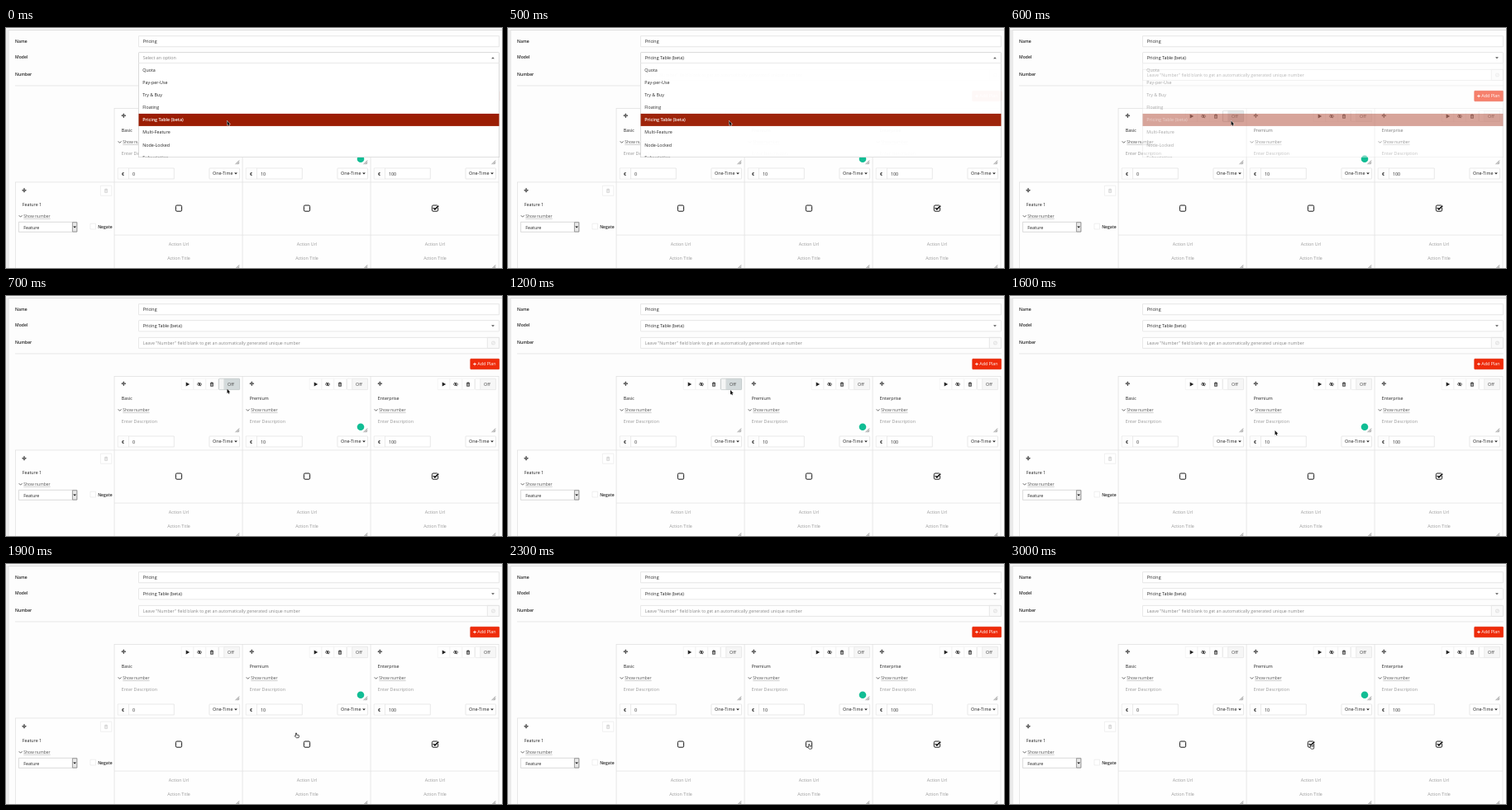
Recreate the animation shown at these times as an HTML page with a canvas. Size 600 px wide and 291 px high, loop 3200 ms.

```html
<!DOCTYPE html>
<html lang="en">
<head>
<meta charset="utf-8">
<title>Pricing form</title>
<style>
html, body { margin: 0; width: 100%; height: 100%; overflow: hidden; background: #fdfdfd; }
canvas { display: block; width: 600px; height: 291px; }
</style>
</head>
<body>
<canvas id="stage"></canvas>
<script>
const W = 600, H = 291, LOOP = 3200, STEP = 100;
const INK = '#222', MUTED = '#999', LINE = '#dedede';
const canvas = document.getElementById('stage');
const ctx = canvas.getContext('2d');
const dpr = window.devicePixelRatio || 1;
canvas.width = W * dpr;
canvas.height = H * dpr;

const OPTIONS = ['Quota', 'Pay-per-Use', 'Try & Buy', 'Floating',
  'Pricing Table (beta)', 'Multi-Feature', 'Node-Locked', 'Subscription'];
const PLANS = [['Basic', '0'], ['Premium', '10'], ['Enterprise', '100']];

// Pointer path: time, x, y
const PATH = [
  [1100, 267.5, 112.5], [1200, 269, 114], [1400, 285.5, 127],
  [1700, 338, 181], [1900, 350.5, 205], [2100, 358, 214], [2300, 363.8, 218.5]
];

function pointer(t) {
  if (t <= PATH[0][0]) return PATH[0].slice(1);
  for (let i = 1; i < PATH.length; i++) {
    const [t0, x0, y0] = PATH[i - 1], [t1, x1, y1] = PATH[i];
    if (t <= t1) {
      const k = (t - t0) / (t1 - t0);
      return [x0 + (x1 - x0) * k, y0 + (y1 - y0) * k];
    }
  }
  return PATH[PATH.length - 1].slice(1);
}

// y is the visual middle of the line; scaling keeps small advances exact
function text(s, x, y, { color = INK, size = 5.35, weight = 400, align = 'left' } = {}) {
  ctx.save();
  ctx.translate(x, y + 1.85);
  ctx.scale(0.1, 0.1);
  ctx.font = `${weight} ${size * 10}px "Open Sans", sans-serif`;
  ctx.textAlign = align;
  ctx.fillStyle = color;
  ctx.fillText(s, 0, 0);
  ctx.restore();
}

function fill(x, y, w, h, color) {
  ctx.fillStyle = color;
  ctx.fillRect(x, y, w, h);
}

function box(x, y, w, h, { bg = '#fff', line = LINE, r = 0, lw = 0.7 } = {}) {
  ctx.beginPath();
  ctx.roundRect(x, y, w, h, r);
  if (bg) {
    ctx.fillStyle = bg;
    ctx.fill();
  }
  ctx.strokeStyle = line;
  ctx.lineWidth = lw;
  ctx.stroke();
}

function poly(points, color) {
  ctx.beginPath();
  points.forEach(([x, y]) => ctx.lineTo(x, y));
  ctx.closePath();
  ctx.fillStyle = color;
  ctx.fill();
}

function stroke(points, color, lw) {
  ctx.beginPath();
  points.forEach(([x, y]) => ctx.lineTo(x, y));
  ctx.strokeStyle = color;
  ctx.lineWidth = lw;
  ctx.stroke();
}

function caret(x, y, up, color = '#555') {
  const d = up ? -1 : 1;
  poly([[x - 1.9, y - d], [x + 1.9, y - d], [x, y + d]], color);
}

function moveIcon(x, y) {
  stroke([[x - 2, y], [x + 2, y]], INK, 0.8);
  stroke([[x, y - 2], [x, y + 2]], INK, 0.8);
  for (let i = 0; i < 4; i++) {
    ctx.save();
    ctx.translate(x, y);
    ctx.rotate(i * Math.PI / 2);
    poly([[2.8, 0], [1.5, -1.1], [1.5, 1.1]], INK);
    ctx.restore();
  }
}

function trashIcon(x, y, color) {
  fill(x - 2, y - 1.8, 4, 0.7, color);
  fill(x - 0.8, y - 2.5, 1.6, 0.7, color);
  box(x - 1.5, y - 0.9, 3, 3.3, { bg: null, line: color, lw: 0.7 });
  stroke([[x - 0.5, y - 0.5], [x - 0.5, y + 2]], color, 0.4);
  stroke([[x + 0.5, y - 0.5], [x + 0.5, y + 2]], color, 0.4);
}

function eyeIcon(x, y) {
  ctx.beginPath();
  ctx.ellipse(x, y, 2.5, 1.6, 0, 0, Math.PI * 2);
  ctx.strokeStyle = INK;
  ctx.lineWidth = 0.65;
  ctx.stroke();
  ctx.beginPath();
  ctx.arc(x, y, 0.9, 0, Math.PI * 2);
  ctx.fillStyle = INK;
  ctx.fill();
  stroke([[x - 1.5, y - 2.3], [x + 1.5, y + 2.3]], INK, 0.6);
}

function grip(x, y) {
  poly([[x, y], [x, y - 5], [x - 5, y]], '#d2d2d2');
  stroke([[x - 4.7, y], [x, y - 4.7]], '#888', 0.6);
  stroke([[x - 2.3, y], [x, y - 2.3]], '#888', 0.6);
}

function showNumber(x, y) {
  stroke([[x - 5.6, y - 1], [x - 3.7, y + 1], [x - 1.8, y - 1]], '#444', 0.8);
  text('Show number', x, y, { color: '#555', size: 4.95 });
  fill(x, y + 2.7, 32.3, 0.45, '#999');
}

function checkbox(x, y, on) {
  box(x - 3.6, y - 3.6, 7.2, 7.2, { bg: '#fff', line: '#1a1a1a', r: 1.4, lw: 1 });
  if (!on) return;
  const tick = [[x - 2, y - 0.6], [x - 0.2, y + 1.3], [x + 4.2, y - 3]];
  stroke(tick, '#fff', 2.7);
  stroke(tick, '#111', 1.6);
}

function drawFields(t, open) {
  const bold = { weight: 600, size: 5.05 };
  text('Name', 11, 16, bold);
  text('Model', 11, 35.5, bold);
  text('Number', 11, 56.5, bold);
  box(160.5, 9.7, 436, 13);
  text('Pricing', 165.7, 16.2);
  box(160.5, 29.6, 436, 13.3, { line: open ? '#ccc' : LINE, r: 0.6 });
  if (t < 100) {
    text('Select an option', 165.7, 36.3, { color: '#888' });
  } else {
    const shade = Math.max(34, 100 - (t - 100) * 0.33);
    text('Pricing Table (beta)', 165.7, 36.3, { color: `rgb(${shade},${shade},${shade})` });
  }
  caret(589, 36.3, open);
  box(160.5, 50.4, 436, 13);
  text('Leave "Number" field blank to get an automatically generated unique number',
    165.7, 57.1, { color: '#888', size: 5.25 });
  box(582.3, 50.4, 14.2, 13, { bg: '#fafafa' });
  box(587.7, 55.2, 3.6, 3.6, { bg: null, line: '#d0d0d0', r: 1, lw: 0.6 });
  stroke([[588.2, 58.3], [590.8, 55.7]], '#d0d0d0', 0.5);
  fill(11, 69.6, 586, 0.7, '#dcdcdc');
  box(561.8, 76.3, 34.8, 12.4, { bg: '#ef2b0a', line: '#e32808', r: 0.6 });
  stroke([[565.2, 82.5], [568.8, 82.5]], '#fff', 0.9);
  stroke([[567, 80.7], [567, 84.3]], '#fff', 0.9);
  text('Add Plan', 570.3, 82.5, { color: '#fff', size: 5.4 });
}

function drawPlan(i, t) {
  const x = 131 + i * 155;
  const [name, price] = PLANS[i];
  const hover = i === 0 && t >= 600 && t < 1300;

  moveIcon(x + 11.3, 106.2);
  for (let b = 0; b < 3; b++) {
    box(x + 81.2 + b * 14.8, 100.2, 14.8, 13.4, { bg: '#fff', line: '#eee', lw: 0.6 });
  }
  poly([[x + 86.7, 104.5], [x + 91.2, 107], [x + 86.7, 109.5]], INK);
  eyeIcon(x + 103, 107);
  trashIcon(x + 118, 107, INK);
  box(x + 126.6, 100.2, 25, 13.4, {
    bg: hover ? '#d3dadb' : '#f6f6f6', line: hover ? '#b9c0c1' : '#e2e2e2', r: 0.7
  });
  fill(x + 127, 100.6, 5.6, 12.6, hover ? '#f4f5f5' : '#fff');
  fill(x + 132.6, 100.6, 0.5, 12.6, '#ddd');
  text('Off', x + 141, 107, { align: 'center', color: '#444' });

  if (i === 0 && t >= 1300 && t < 1500) {
    box(x + 4.5, 117.5, 147, 13, { line: '#555', lw: 0.9 });
  }
  text(name, x + 8.8, 124.2);
  showNumber(x + 10.3, 138.3);
  text('Enter Description', x + 8.8, 152.2, { color: MUTED });
  grip(x + 151.2, 165.2);

  box(x + 4.3, 170, 68, 13);
  fill(x + 4.7, 170.4, 12.6, 12.2, '#fdfdfd');
  fill(x + 17, 170, 0.6, 13, LINE);
  text('€', x + 10.6, 176.7, { weight: 700, size: 5.2, align: 'center' });
  text(price, x + 22, 176.7);
  box(x + 115, 170, 36.6, 13, { r: 0.6 });
  text('One-Time', x + 119, 176.5, { size: 5.4 });
  caret(x + 147, 176.6, false, INK);

  checkbox(x + 78, 218.6, i === 2 || (i === 1 && t >= 2800));
  text('Action Url', x + 78, 261.7, { align: 'center', color: MUTED });
  text('Action Title', x + 78, 278.7, { align: 'center', color: MUTED });
  grip(x + 151.2, 292);
}

function drawTable(t) {
  fill(131, 97, 465, 194, '#fefefe');
  fill(11, 187, 120, 104, '#fefefe');
  for (let i = 0; i < 4; i++) fill(130.7 + i * 155, 97, 0.7, 194, LINE);
  fill(131, 97, 465, 0.7, LINE);
  fill(11, 186.6, 585, 0.7, LINE);
  fill(131, 250.7, 465, 0.7, LINE);
  fill(11, 187, 0.7, 104, LINE);
  PLANS.forEach((_, i) => drawPlan(i, t));
  ctx.beginPath();
  ctx.arc(429, 158.8, 4.3, 0, Math.PI * 2);
  ctx.fillStyle = '#11bd94';
  ctx.fill();
}

function drawFeature() {
  moveIcon(22, 196.8);
  box(114.4, 191.2, 13.4, 12, { line: '#e6e6e6', lw: 0.6 });
  trashIcon(121.1, 197.2, '#ccc');
  text('Feature 1', 19.7, 214.2);
  showNumber(21.3, 228.2);
  box(15.4, 235.3, 70.5, 12, { line: '#ccc' });
  text('Feature', 21.3, 242);
  box(80.4, 235.7, 5.4, 11.3, { bg: '#e9e9e9', line: '#777', lw: 0.7 });
  caret(83.1, 241.5, false, '#111');
  box(102, 237.2, 6.5, 6.8, { line: '#e4e4e4', lw: 0.6 });
  text('Negate', 111.2, 240.7, { weight: 600, size: 5 });
}

function drawMenu(alpha) {
  if (alpha <= 0) return;
  ctx.save();
  ctx.globalAlpha = alpha;
  ctx.beginPath();
  ctx.rect(160, 43, 437, 114);
  ctx.clip();
  fill(160, 43, 437, 114, '#fff');
  fill(160.2, 43, 0.7, 114, '#ccc');
  fill(596, 43, 0.7, 114, '#ccc');
  OPTIONS.forEach((s, i) => {
    const y = 51 + i * 15.12, active = i === 4;
    if (active) fill(160.5, 103.9, 436, 15, '#9b1d03');
    text(s, 165.3, y, active ? { color: '#fff', weight: 600, size: 5.4 } : {});
  });
  fill(160, 156.4, 437, 0.6, '#ccc');
  ctx.restore();
}

function drawArrow(x, y) {
  const shape = [[0, 0], [0, 5.4], [1.2, 4.4], [2, 6.2], [2.9, 5.8], [2.1, 4], [3.7, 3.9]]
    .map(([dx, dy]) => [x + dx, y + dy]);
  stroke([...shape, shape[0]], '#fff', 0.8);
  poly(shape, '#111');
}

function drawHand(x, y) {
  const shape = [[0, 0], [1, 0], [1.2, 2], [3.6, 2.4], [4.1, 3.2], [3.6, 5.6],
    [0.7, 5.8], [-1.3, 3.6], [-0.9, 3], [0, 3.4]].map(([dx, dy]) => [x + dx, y + dy]);
  poly(shape, '#fff');
  stroke([...shape, shape[0]], '#222', 0.75);
  stroke([[x + 1.6, y + 2.6], [x + 1.6, y + 3.8]], '#444', 0.4);
  stroke([[x + 2.6, y + 2.7], [x + 2.6, y + 3.8]], '#444', 0.4);
}

function menuAlpha(t) {
  if (t < 500) return 1;
  return t < 600 ? 0.97 : t < 700 ? 0.4 : 0;
}

function draw(t) {
  ctx.setTransform(dpr, 0, 0, dpr, 0, 0);
  fill(0, 0, W, H, '#fdfdfd');
  fill(0, 0, W, 2, '#f6f6f6');
  fill(0, 2, W, 1, '#dcdcdc');
  fill(0, 2, 3, H, '#ebebeb');
  fill(3, 3, 0.6, H, '#e0e0e0');
  drawFields(t, t < 600);
  drawTable(t);
  drawFeature();
  drawMenu(menuAlpha(t));
  const [x, y] = pointer(t);
  (y > 187 ? drawHand : drawArrow)(x, y);
}

const start = performance.now();
function tick() {
  const t = (performance.now() - start) % LOOP;
  draw(Math.floor(t / STEP) * STEP);
  requestAnimationFrame(tick);
}
tick();
</script>
</body>
</html>
```
